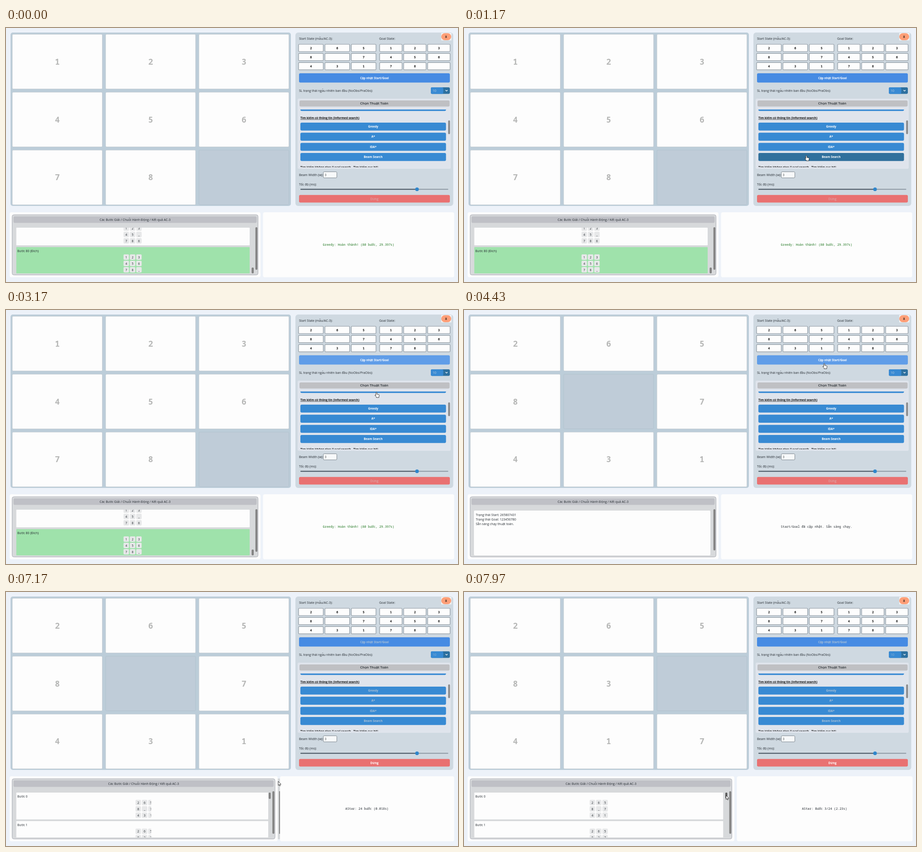
An HTML page that plays this animation: 998 by 561 pixels, repeating every 8000 ms.

```html
<!DOCTYPE html>
<html lang="vi">
<head>
<meta charset="utf-8">
<title>8-puzzle</title>
<style>
html, body { margin: 0; width: 100%; height: 100%; overflow: hidden; background: #edf2f9; }
#stage { display: block; width: 998px; height: 561px; }
text { font-family: "Open Sans", "Noto Sans", sans-serif; white-space: pre; }
.mono { font-family: "Noto Sans Mono", "DejaVu Sans Mono", monospace; }
</style>
</head>
<body>
<svg id="stage" viewBox="0 0 998 561">
  <g id="board"></g>
  <g id="panel"></g>
  <g id="steps"></g>
  <g id="status"></g>
  <g id="cursor"></g>
</svg>
<script>
const LOOP = 8000;
const START = "2658_7431", GOAL = "12345678_";
const CLICK_UPDATE = 4250, RUN = 5720, LISTED = 6930;
const INK = "#242a30", WHITE = "#fdfdfd";

// box given by its edges
const box = (x1, y1, x2, y2, fill, r = 0, more = "") =>
  `<rect x="${x1}" y="${y1}" width="${x2 - x1}" height="${y2 - y1}" rx="${r}" fill="${fill}" ${more}/>`;

// text centred vertically on y
const label = (s, x, y, { size = 7, fill = INK, weight = 400, anchor = "start", mono = false, more = "" } = {}) =>
  `<text x="${x}" y="${y + size * 0.36}" font-size="${size}" fill="${fill}" font-weight="${weight}"
    text-anchor="${anchor}" class="${mono ? "mono" : ""}" ${more}>${s}</text>`;

const mid = (s, x, y, o = {}) => label(s, x, y, { anchor: "middle", ...o });

// clipped region that keeps stage coordinates
const clip = (x1, y1, x2, y2, body) =>
  `<svg x="${x1}" y="${y1}" width="${x2 - x1}" height="${y2 - y1}" viewBox="${x1} ${y1} ${x2 - x1} ${y2 - y1}">${body}</svg>`;

const cells = (state, draw) => [...state].map((c, i) => draw(c, i % 3, Math.floor(i / 3))).join("");

function drawBoard(state) {
  return box(10, 10, 629, 393, "#bccdd9", 5) + cells(state, (c, col, row) => {
    const x = 14 + col * 206, y = 14 + row * 127.9;
    if (c === "_") return box(x, y, x + 198.6, y + 120.6, "#bfccd8", 2, 'stroke="#aebfcb" stroke-width=".7"');
    return box(x, y, x + 198.6, y + 120.6, WHITE, 2, 'stroke="#c4cbd0" stroke-width=".8"') +
      mid(c, x + 99.3, y + 60.2, { size: 18, fill: "#b6b7b6", weight: 700, mono: true });
  });
}

function entries(state, x0, step, w) {
  return cells(state, (c, col, row) => {
    const x = x0 + col * step, y = 36 + row * 20.2;
    return box(x, y, x + w, y + 16, WHITE, 1.5, 'stroke="#8b969f" stroke-width="1.2"') +
      (c === "_" ? "" : mid(c, x + w / 2, y + 8, { weight: 700, mono: true, fill: "#111" }));
  });
}

const ALGOS = ["Greedy", "A*", "IDA*", "Beam Search"];
const algoTop = i => 209 + i * 22.35;

function drawPanel(hover, busy) {
  const off = "#a9c0d6";
  const bold = { size: 6.4, weight: 700, fill: busy ? off : "#fff" };
  const head = { size: 6.5, weight: 700, fill: "#111", more: 'text-decoration="underline"' };
  const algos = ALGOS.map((name, i) => {
    const y = algoTop(i);
    return box(650, y, 971.5, y + 17.6, hover === name ? "#30709d" : "#388ad3", 3) + mid(name, 810.7, y + 8.8, bold);
  }).join("");
  return box(639, 10, 987.5, 393, "#cfd9e1", 6) +
    box(961, 11, 983.5, 27.3, "#f3f4f4") + box(961, 11.5, 983, 27, "#ff9f78", 8) +
    mid("X", 971.7, 19, { size: 7, weight: 700, mono: true, fill: "#111" }) +
    label("Start State (mẫu/AC-3):", 647, 23) + label("Goal State:", 824, 23) +
    entries(START, 646, 58.2, 54.5) + entries(GOAL, 825, 53, 49.5) +
    box(647, 100, 980, 120.6, hover === "update" ? "#609de8" : "#468be3", 3) +
    mid("Cập nhật Start/Goal", 813.5, 110.4, bold) +
    label("SL trạng thái ngẫu nhiên ban đầu (NoObs/PraObs):", 647, 138.3, { size: 6.93 }) +
    box(938, 131, 980, 145.5, "#2d709f", 3) + box(938, 131, 965.5, 145.5, "#388ad3", 3) +
    label("10", 942, 138.3, { fill: busy ? "#8fb2d3" : "#b9cde0" }) +
    `<path d="M970.4 137.3 l2.3 2 2.3 -2" fill="none" stroke="#fff" stroke-width="1.2"/>` +
    box(644, 156, 982, 311, "#dfe4ec", 3) + box(648, 160, 979.5, 173.6, "#bfc0c3", 3) +
    mid("Chọn Thuật Toán", 813, 166.7, { size: 7.6, weight: 600 }) +
    clip(644, 180, 982, 307.6,
      box(650, 165.6, 971.5, 183.2, "#388ad3", 3) +
      label("Tìm kiếm có thông tin (Informed search)", 650, 198.4, head) + algos +
      label("Tìm kiếm không gian (Local search - Tìm kiếm cục bộ)", 650, 308, head)) +
    box(976.3, 204, 980.3, 234.6, "#88898b", 2) +
    label("Beam Width (w):", 647, 324.2) +
    box(700.5, 317.6, 730.5, 331, "#f7f9fa", 2, 'stroke="#7b858d" stroke-width="1"') +
    label("3", 703.5, 324.3, { mono: true, fill: "#555" }) +
    label("Tốc độ (ms):", 647, 345.3) +
    box(650, 355.2, 976.5, 357.2, "#8d99a3", 1) + box(650, 355.2, 907, 357.2, "#4c5a66", 1) +
    `<circle cx="907.5" cy="356.2" r="4" fill="#2f86cc"/>` +
    box(647, 368.8, 980, 385.6, "#e97171", 3) +
    mid("Dừng", 813.5, 377.3, { weight: busy ? 700 : 400, size: busy ? 6.6 : 7, fill: busy ? "#fff" : "#d6b4b6" });
}

// white cards, list frame, title and outer scroll bar
function frame(right, leftEnd, rightStart, end, barEnd) {
  return box(8, 407, leftEnd, 550.5, WHITE, 4) + box(rightStart, 407, end, 550.5, WHITE, 4) +
    box(13.5, 412.5, right - 0.5, 545.5, "#d7d9db", 4, 'stroke="#aaacb4" stroke-width="1"') +
    box(16.5, 416, right - 3.5, 430.6, "#bfc0c6", 3) +
    mid("Các Bước Giải / Chuỗi Hành Động / Kết quả AC-3", (right + 13) / 2, 423.3) +
    box(right - 6.3, 440, right - 1.9, barEnd, "#838383", 2);
}

function row(y1, y2, end, title, state, cx, cy, fill = WHITE, cut = end) {
  const mini = cells(state, (c, col, r) => {
    const x = cx + (col - 1) * 14, y = cy + r * 14;
    return box(x - 6, y - 6, x + 6, y + 6, "#e7e8e9", 2) + mid(c, x, y);
  });
  return clip(22.5, y1, end, y2, box(22.5, y1, end, y2, fill, 1) + label(title, 25, y1 + 8)) +
    clip(22.5, y1, cut, y2, mini);
}

const STEP = ["2658_7431", "2658374_1", "26583741_", "26583_417"];

const notes = end => box(22, 443, end, 542, WHITE, 2) +
  ["Trạng thái Start: 265807431", "Trạng thái Goal: 123456780", "Sẵn sàng chạy thuật toán."]
    .map((s, i) => label(s, 26, 452.6 + i * 10)).join("");

const list = (end, cx, cut) =>
  row(443, 502.6, end, "Bước 0", STEP[0], cx, 465, WHITE, cut) +
  row(506, 542, end, "Bước 1", STEP[1], cx, 528.5, WHITE, cut);

const SCENES = {
  done: () => frame(557, 562, 567.5, 989.5, 534) +
    row(441, 480, 538, "", "12345_786", 279.5, 442) +
    row(484, 542, 538, "Bước 80 (Đích)", GOAL, 279.5, 506, "#9fe2ab") +
    box(542.3, 529, 547, 542, "#838383", 2),
  ready: () => frame(557, 562, 567.5, 989.5, 531) + notes(544),
  run: () => frame(610, 618, 612, 990.5, 531) + notes(596),
  found: () => frame(594.5, 600, 605, 989.5, 534) + list(579, 306, 320.5) +
    box(580, 443, 584.5, 457, "#838383", 2) +
    box(600, 412, 605, 546, "#d7d9db") + box(603, 440, 605, 534, "#838383"),
  play: () => frame(592, 597, 602.5, 990.5, 534) + list(572.5, 297.5) +
    box(577, 443, 581.5, 456, "#5c5c5c", 2)
};

// time, scene, board, status text, status colour, status centre
const BEATS = [
  [0, "done", GOAL, "Greedy: Hoàn thành! (80 bước, 29.397s)", "#1f761f", 778.5],
  [CLICK_UPDATE, "ready", START, "Start/Goal đã cập nhật. Sẵn sàng chạy.", INK, 778.5],
  [RUN, "run", START, "Đang chạy AStar ", "#1c1ca6", 805],
  [LISTED, "found", START, "AStar: 24 bước (0.018s)", INK, 797],
  [7230, "play", STEP[1], "AStar: Bước 1/24 (1.50s)", INK, 796],
  [7590, "play", STEP[2], "AStar: Bước 2/24 (1.87s)", INK, 796],
  [7950, "play", STEP[3], "AStar: Bước 3/24 (2.23s)", INK, 796]
];

// pointer tip: time, x, y
const PATH = [
  [0, 820, 580], [300, 820, 580], [900, 756, 283], [1170, 756, 281.5], [1900, 757, 281],
  [3000, 810, 215], [3170, 818, 181.5], [3350, 815, 112], [4250, 797, 115], [4430, 795.5, 118],
  [4700, 795, 118], [5200, 752, 240], [5600, 751, 241], [5870, 751, 262], [6300, 748, 290],
  [6800, 640, 400], [7170, 601, 418], [7600, 582, 446], [8000, 578.5, 449]
];

function pointer(t) {
  const i = Math.max(1, PATH.findIndex(p => p[0] > t));
  const [t0, x0, y0] = PATH[i - 1], [t1, x1, y1] = PATH[i];
  const u = (t - t0) / (t1 - t0), k = u * u * (3 - 2 * u);
  return [x0 + (x1 - x0) * k, y0 + (y1 - y0) * k];
}

function hovered(t, x, y) {
  if (t >= RUN) return t < 6400 ? "A*" : "";
  if (t >= 3100 && t < 3350 || y > 99 && y < 121) return "update";
  return ALGOS.find((_, i) => y >= algoTop(i) && y <= algoTop(i) + 17.6) || "";
}

const HAND = `<path d="M-1.2 .8 Q0 -.6 1.1 .8 V4.4 L5 5.3 Q6.3 5.6 6.2 7 L5.4 10 V11.8 H-.3 V10.6 L-3.2 7.4 Q-3.6 6 -2.2 6.2 L-1.2 7.2Z"
  fill="#fff" stroke="#111" stroke-width=".8" stroke-linejoin="round"/>`;
const ARROW = `<path d="M0 0 V9.2 L2.1 7.3 L3.5 10.4 L4.8 9.8 L3.5 6.8 H6.3Z"
  fill="#fff" stroke="#111" stroke-width=".8" stroke-linejoin="round"/>`;

const shown = {};
function put(id, key, make) {
  if (shown[id] === key) return;
  shown[id] = key;
  document.getElementById(id).innerHTML = make();
}

function render(t) {
  const [from, scene, state, text, color, cx] = BEATS.filter(b => b[0] <= t).pop();
  const [x, y] = pointer(t);
  const hover = hovered(t, x, y), busy = t >= RUN;
  const spin = scene === "run" ? "|/-\\"[Math.floor((t - from) / 100) % 4] : "";
  const hand = hover && t < 6300 || t > 3130 && t < 3400;
  put("board", state, () => drawBoard(state));
  put("panel", hover + busy, () => drawPanel(hover, busy));
  put("steps", scene, SCENES[scene]);
  put("status", text + spin, () => mid(text + spin, cx, 478.7, { size: 6.93, fill: color, mono: true }));
  put("cursor", hand ? "hand" : "arrow", () => hand ? HAND : ARROW);
  document.getElementById("cursor").setAttribute("transform", `translate(${x} ${y})`);
}

const begin = performance.now();
function tick() {
  render((performance.now() - begin) % LOOP);
  requestAnimationFrame(tick);
}
tick();
</script>
</body>
</html>
```
